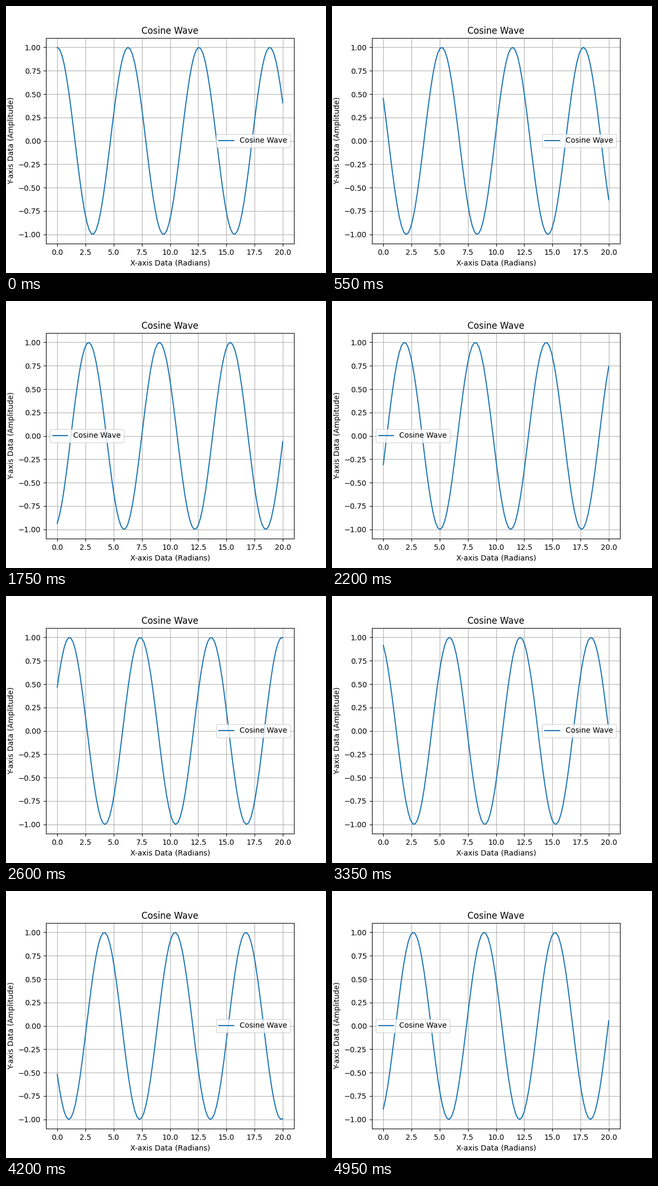
Animation, 600 px wide and 500 px high, one loop 5 s. Source, as a matplotlib script:

```python
import numpy as np
import matplotlib.pyplot as plt
from matplotlib.animation import FuncAnimation

FRAMES = 100
INTERVAL = 50      # ms
PHASE_STEP = 0.1   # radians per frame

plt.rcParams["font.family"] = "DejaVu Sans"

x = np.linspace(0, 20, 100)

fig, ax = plt.subplots(figsize=(6, 5), dpi=100)
line, = ax.plot(x, np.cos(x), label="Cosine Wave")
ax.set_title("Cosine Wave")
ax.set_xlabel("X-axis Data (Radians)")
ax.set_ylabel("Y-axis Data (Amplitude)")
ax.grid(True)
# "best" is re-evaluated on every draw, so the legend jumps sides with the wave
ax.legend(loc="best")


def update(frame):
    line.set_ydata(np.cos(x + PHASE_STEP * frame))
    return line,


anim = FuncAnimation(fig, update, frames=FRAMES, interval=INTERVAL,
                     repeat=True, repeat_delay=0, blit=False)

plt.show()
```
